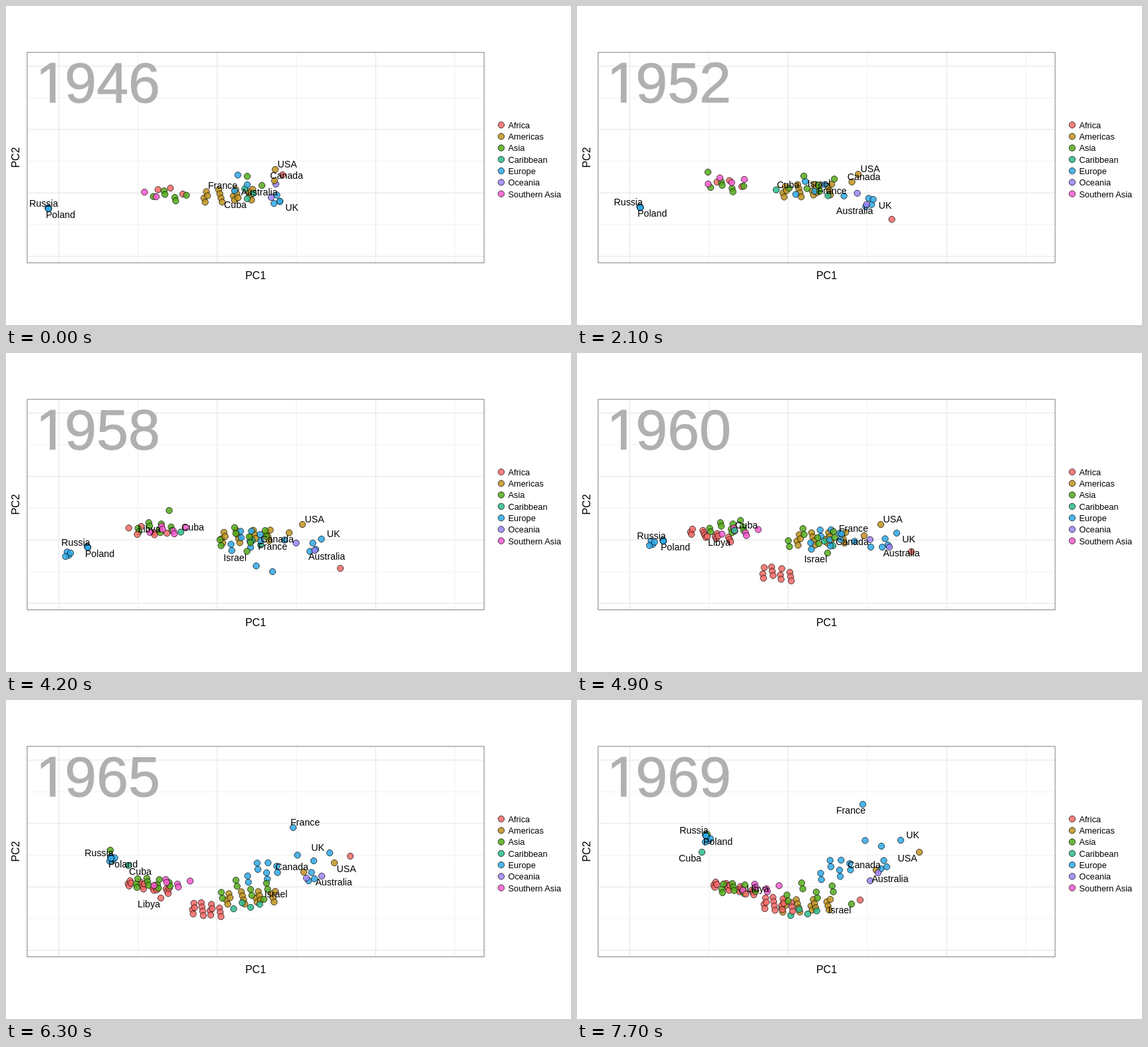
Recreate the animation shown at these times as an HTML page. Size 850x480 px, loop 8 s.

```html
<!DOCTYPE html>
<html lang="en">
<head>
<meta charset="utf-8">
<title>PC1 and PC2 by year</title>
<style>
  html, body { margin: 0; width: 100%; height: 100%; overflow: hidden; background: #fff; }
  svg { display: block; width: 850px; height: 480px; font-family: "Liberation Sans", Arial, sans-serif; }
  circle { stroke: #000; stroke-opacity: .7; stroke-width: 1; fill-opacity: .85; }
  .year { font-size: 86px; fill: #b0b0b0; stroke: #b0b0b0; stroke-width: 1; }
  .label { font-size: 14.2px; text-anchor: middle; }
  .axis { font-size: 16px; text-anchor: middle; }
  .legend { font-size: 12.8px; }
</style>
</head>
<body>
<svg viewBox="0 0 850 480">
  <clipPath id="noFoot">
    <rect x="40" y="70" width="50" height="67.3"/>
    <rect x="65.9" y="137" width="8.6" height="14"/>
  </clipPath>
  <g id="grid"></g>
  <g class="year">
    <text x="44.8" y="144.7" clip-path="url(#noFoot)">1</text>
    <text id="year" x="88.3" y="144.7"></text>
  </g>
  <g id="dots"></g>
  <g id="labels"></g>
  <rect x="31.8" y="69.8" width="687.4" height="316.6" fill="none" stroke="#7f7f7f"/>
  <text class="axis" x="375.5" y="411">PC1</text>
  <text class="axis" transform="translate(19.5 228) rotate(-90)">PC2</text>
  <g id="legend"></g>
</svg>
<script>
const STEP = 350, LOOP = 8000, PANEL_LEFT = 32;
const YEARS = Array.from({ length: 24 }, (_, i) => 1946 + i).filter(y => y !== 1964);
const COLORS = {
  "Africa": "#f56a66", "Americas": "#bf9320", "Asia": "#55ac1b", "Caribbean": "#2bbb8d",
  "Europe": "#2ea8e6", "Oceania": "#9c82fa", "Southern Asia": "#f95bd0"
};
const $ = id => document.getElementById(id);

function add(parent, tag, attrs, text = "") {
  const el = document.createElementNS("http://www.w3.org/2000/svg", tag);
  for (const k in attrs) el.setAttribute(k, attrs[k]);
  el.textContent = text;
  return $(parent).appendChild(el);
}

// Grid: every other line is a fainter minor line
const gridLine = (d, minor) => add("grid", "path", { d, stroke: minor ? "#f0f0f0" : "#e3e3e3" });
for (const minor of [1, 0]) {
  for (let i = minor; i < 6; i += 2) gridLine(`M${79.3 + i * 119.2} 70V386`, minor);
  for (let i = minor; i < 7; i += 2) gridLine(`M32 ${90.4 + i * 47.7}H719`, minor);
}

Object.entries(COLORS).forEach(([name, fill], i) => {
  const y = 179 + i * 17.28;
  add("legend", "circle", { cx: 745, cy: y, r: 4.7, fill });
  add("legend", "text", { class: "legend", x: 755.5, y: y + 4.9 }, name);
});

// Position on a path of { year: [x, y, side] }; the side holds until the next key year
function pointAt(path, year) {
  const keys = Object.keys(path).map(Number);
  const a = keys.findLast(k => k <= year) ?? keys[0];
  const b = keys.find(k => k > a) ?? a;
  const f = b > a ? Math.max(0, (year - a) / (b - a)) : 0;
  const mix = n => path[a][n] + (path[b][n] - path[a][n]) * f;
  return { x: mix(0), y: mix(1), side: path[a][2] };
}

const items = [];
const dot = region => add("dots", "circle", { r: 4.7, fill: COLORS[region] });

// Evenly scattered offset in -1..1 for the i-th member of a cloud
const scatter = (i, step) => (.5 + i * step) % 1 * 2 - 1;

// A drifting cloud. members: { year: head count }; lean: how far it slopes down to the right
function cloud(region, members, [w, h], path, lean = 0) {
  const joined = Object.entries(members);
  const total = joined.at(-1)[1];
  for (let i = 0; i < total; i++) {
    const u = scatter(i, .7549), v = scatter(i, .5698);
    const dx = u * w, dy = (lean * u + (1 - lean) * v) * h;
    items.push({
      el: dot(region), path, since: +joined.find(([, n]) => n > i)[0],
      shift: () => [dx, dy]
    });
  }
}

// A labelled dot; its label sits at one corner, pushed back inside the panel
function country(name, region, path, side, since = 1946) {
  const el = add("labels", "text", { class: "label", y: 5 }, name);
  const min = PANEL_LEFT + 3 + el.getComputedTextLength() / 2;
  items.push({ el: dot(region), path, since, shift: () => [0, 0] });
  items.push({
    el, path, since,
    shift: p => {
      const [ns, ew] = p.side || side;
      const dx = ew === "E" ? 18 : -18;
      return [Math.max(dx, min - p.x), ns === "N" ? -8 : 9];
    }
  });
}

const bloc = { 1946: [64, 305], 1956: [116, 302], 1960: [130, 283], 1965: [158, 238], 1969: [194, 204] };

cloud("Americas", { 1946: 17 }, [45, 11],
  { 1946: [342, 286], 1956: [362, 273], 1960: [375, 280], 1965: [376, 298], 1969: [352, 310] });
cloud("Caribbean", { 1946: 2, 1962: 4 }, [26, 8],
  { 1946: [372, 282], 1960: [385, 290], 1965: [368, 312], 1969: [347, 322] });
cloud("Africa", { 1946: 3, 1956: 5, 1960: 14, 1962: 18 }, [38, 14],
  { 1946: [266, 283], 1956: [236, 264], 1960: [208, 276], 1965: [221, 283], 1969: [243, 285] }, .6);
cloud("Africa", { 1960: 12, 1963: 15 }, [27, 16],
  { 1960: [306, 334], 1965: [307, 317], 1969: [308, 309] }, .3);
cloud("Africa", { 1946: 1 }, [0, 0],
  { 1946: [416, 254], 1950: [459, 307], 1956: [503, 349], 1960: [503, 299], 1965: [518, 235], 1969: [426, 301] });
cloud("Europe", { 1946: 2 }, [1.5, 1.5], bloc);
cloud("Europe", { 1955: 4 }, [5, 6],
  { 1956: [75, 321], 1960: [114, 288], 1965: [161, 241], 1969: [198, 212] });
cloud("Europe", { 1946: 3 }, [9, 11],
  { 1946: [412, 294], 1956: [464, 302], 1960: [468, 289], 1965: [464, 269], 1969: [466, 251] });
cloud("Europe", { 1946: 2, 1947: 4, 1955: 7, 1957: 9 }, [29, 17],
  { 1946: [363, 269], 1956: [354, 285], 1960: [380, 281], 1965: [392, 260], 1969: [395, 256] });
cloud("Europe", { 1955: 2 }, [50, 10],
  { 1956: [360, 366], 1960: [442, 292], 1965: [463, 242], 1969: [458, 220] });
cloud("Asia", { 1946: 6, 1955: 9, 1963: 11 }, [33, 13],
  { 1946: [254, 288], 1950: [235, 279], 1956: [230, 265], 1960: [232, 265], 1965: [228, 278], 1969: [250, 286] }, .3);
cloud("Asia", { 1946: 2, 1947: 5, 1957: 8 }, [45, 16],
  { 1946: [385, 270], 1950: [360, 267], 1956: [370, 275], 1960: [362, 278], 1965: [368, 285], 1969: [360, 289] });
cloud("Asia", { 1947: 1 }, [0, 0],
  { 1947: [194, 244], 1952: [197, 250], 1956: [245, 222], 1960: [246, 252], 1965: [157, 226], 1969: [196, 202] });
cloud("Southern Asia", { 1946: 2, 1947: 3, 1951: 4, 1955: 6 }, [36, 8],
  { 1946: [226, 287], 1950: [224, 266], 1956: [250, 265], 1965: [258, 277], 1969: [285, 284] });
cloud("Oceania", { 1946: 1 }, [0, 0],
  { 1946: [406, 268], 1956: [432, 291], 1965: [452, 268], 1969: [441, 272] });

country("Russia", "Europe", bloc, "NW");
country("Poland", "Europe", bloc, "SE");
country("France", "Europe",
  { 1946: [344, 278, "NW"], 1956: [440, 291, "SW"], 1960: [398, 272, "NE"], 1965: [432, 192, "NE"], 1969: [430, 157, "SW"] });
country("UK", "Europe",
  { 1946: [412, 294, "SE"], 1956: [468, 289, "NE"], 1960: [481, 271, "SE"], 1965: [487, 230, "NW"], 1969: [487, 211, "NE"] });
country("USA", "Americas",
  { 1946: [405, 246, "NE"], 1956: [435, 258, "NE"], 1960: [457, 258, "NE"], 1965: [494, 245, "SE"], 1969: [515, 229, "SW"] });
country("Canada", "Americas",
  { 1946: [404, 263, "NE"], 1956: [420, 266, "SW"], 1960: [432, 275, "SW"], 1965: [448, 259, "NW"], 1969: [450, 256, "NW"] });
country("Cuba", "Caribbean",
  { 1946: [363, 290, "SW"], 1950: [305, 279, "NE"], 1956: [289, 272, "NE"], 1960: [237, 267, "NE"], 1965: [184, 249, "SE"], 1969: [188, 229, "SW"] });
country("Israel", "Asia",
  { 1950: [345, 264, "NE"], 1956: [348, 296, "SW"], 1960: [377, 301, "SW"], 1965: [388, 300, "NE"], 1969: [413, 307, "SW"] }, "", 1949);
country("Libya", "Africa",
  { 1956: [199, 270, "NE"], 1960: [196, 276, "SE"], 1965: [233, 298, "SW"], 1969: [254, 292, "NE"] }, "", 1955);
country("Australia", "Oceania",
  { 1946: [399, 288, "NW"], 1950: [424, 297, "SW"], 1956: [459, 302, "SE"], 1960: [470, 292, "SE"], 1965: [475, 265, "SE"], 1969: [453, 260, "SE"] });

function show(year) {
  $("year").textContent = String(year).slice(1);
  for (const { el, path, since, shift } of items) {
    const p = pointAt(path, year), [dx, dy] = shift(p);
    el.style.display = year < since ? "none" : "";
    el.setAttribute("transform", `translate(${p.x + dx} ${p.y + dy})`);
  }
}

let shown;
function tick(now) {
  const year = YEARS[Math.min(YEARS.length - 1, Math.floor(now % LOOP / STEP))];
  if (year !== shown) show(shown = year);
  requestAnimationFrame(tick);
}
tick(performance.now());
</script>
</body>
</html>
```
